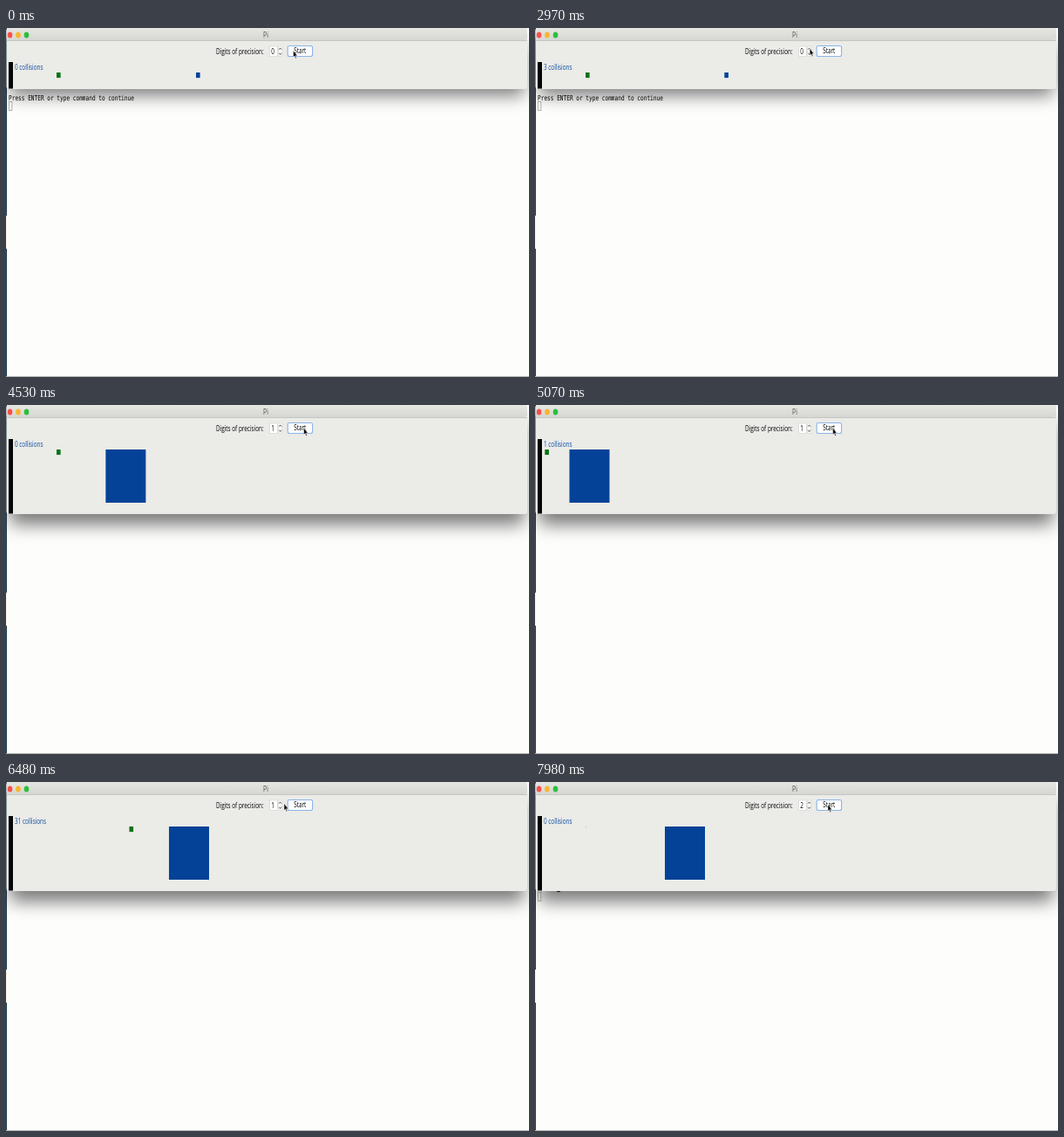
These frames come from a looping animation (600x400 px, 8000 ms). An HTML page:

```html
<!DOCTYPE html>
<html lang="en">
<head>
<meta charset="utf-8">
<title>Colliding blocks</title>
<style>
  html, body { margin: 0; width: 100%; height: 100%; overflow: hidden; background: #fdfdfc; }
  svg { display: block; width: 100vw; height: 100vh; }
  text { font: 8.5px "Open Sans", "Noto Sans", sans-serif; fill: #000; white-space: pre; }
  .mono { font: 8.17px "DejaVu Sans Mono", "Liberation Mono", monospace; }
  .title { font-size: 9px; fill: #4a4a4a; }
  .count { fill: #0a4a9c; }
</style>
</head>
<body>
<svg viewBox="0 0 600 400" preserveAspectRatio="none">
  <defs>
    <filter id="soft" filterUnits="userSpaceOnUse" x="-40" y="-40" width="680" height="300">
      <feGaussianBlur stdDeviation="10"/>
    </filter>
    <linearGradient id="bar" x1="0" y1="0" x2="0" y2="1">
      <stop offset="0" stop-color="#e6e6e3"/>
      <stop offset="1" stop-color="#d6d6d3"/>
    </linearGradient>
  </defs>

  <rect width="600" height="400" fill="#fdfdfc"/>
  <rect width="1" height="400" fill="#173c50"/>
  <rect y="215" width="1" height="38" fill="#f4f1e0"/>
  <rect y="399" width="600" height="1" fill="#b4b4b2"/>

  <text class="mono" id="prompt" transform="translate(3 82.5) scale(.75 1)">Press ENTER or type command to continue</text>
  <rect id="smudge" x="25" y="124.5" width="4" height="1.5" fill="#222"/>
  <rect id="caret" x="3.5" width="3.4" height="10" fill="none" stroke="#a5a5a2" stroke-width=".8"/>

  <rect id="shade" x="5" y="20" width="589" opacity=".52" filter="url(#soft)"/>

  <rect id="window" x="0.5" width="597.5" rx="3" fill="#ebebe8"/>
  <rect x="0.5" width="597.5" height="14" rx="3" fill="url(#bar)"/>
  <rect x="0.5" y="14" width="597.5" height=".8" fill="#bcbcba"/>
  <ellipse cx="4.6" cy="8" rx="2.8" ry="3.5" fill="#f95048"/>
  <ellipse cx="14" cy="8" rx="2.8" ry="3.5" fill="#f8b52e"/>
  <ellipse cx="23.5" cy="8" rx="2.8" ry="3.5" fill="#2bbf3c"/>
  <text class="title" text-anchor="middle" transform="translate(298 11) scale(.75 1)">Pi</text>

  <text transform="translate(241 29.5) scale(.75 1)">Digits of precision:</text>
  <rect x="302.5" y="21" width="9" height="11.5" fill="#fff" stroke="#cfcfcd" stroke-width=".6"/>
  <text id="digit" transform="translate(304.3 29.7) scale(.75 1)">0</text>
  <rect x="312.3" y="20.8" width="4.6" height="11.8" rx="1.8" fill="#fbfbfa" stroke="#c8c8c6" stroke-width=".5"/>
  <path d="M313.3 24.7l1.3-1.8l1.3 1.8M313.3 28.7l1.3 1.8l1.3-1.8" fill="none" stroke="#333" stroke-width=".8"/>
  <rect x="323.2" y="20.5" width="28.4" height="12" rx="2" fill="#fff" stroke="#8cb4e6" stroke-width="1.1"/>
  <text text-anchor="middle" transform="translate(337.3 29.4) scale(.75 1)">Start</text>

  <rect id="wall" x="3" y="39" width="5" fill="#050505"/>
  <text class="count" id="count" transform="translate(10 48.3) scale(.75 1)">0 collisions</text>
  <rect id="small" y="51" fill="#087410"/>
  <rect id="big" y="51" fill="#044298"/>
  <path id="pointer" d="M0 0V8L1.6 6.6L2.7 9.4L3.8 8.8L2.7 6.2H4.8Z" fill="#0a0a0a" stroke="#fff" stroke-width=".5"/>
</svg>
<script>
  const LOOP = 8000, STEP = 30;
  const WALL = 8, SMALL_X = 58, BIG_X = 218, ASPECT = 61 / 46;
  const $ = id => document.getElementById(id);
  const set = (id, attrs) => {
    for (const name in attrs) $(id).setAttribute(name, attrs[name]);
  };

  // keys: [time, distance along the unfolded path]
  const runs = [
    { from: 0, digits: 0, small: 4.6, big: 4.6, height: 70,
      keys: [[30, 0], [3240, 447.8]] },
    { from: 3240, digits: 1, small: 4.6, big: 46, height: 125,
      keys: [[3787, 0], [5200, 197.1], [5320, 218.4], [6690, 409.5]] },
    { from: 6690, digits: 2, small: 0.46, big: 46, height: 125,
      keys: [[7485, 0], [8000, 71.8]] }
  ];

  const pointerKeys = [
    [2250, 329.5, 25.5], [2700, 315.2, 23.3], [3300, 315.2, 23.3], [3690, 341.6, 26],
    [6100, 341.6, 26], [6480, 319, 24.5], [6570, 315.2, 23.3],
    [6960, 315.2, 23.3], [7380, 336, 25.5]
  ];

  function track(keys, t, col = 1) {
    if (t <= keys[0][0]) return keys[0][col];
    for (let i = 1; i < keys.length; i++) {
      const a = keys[i - 1], b = keys[i];
      if (t <= b[0]) return a[col] + (b[col] - a[col]) * (t - a[0]) / (b[0] - a[0]);
    }
    return keys[keys.length - 1][col];
  }

  // Elastic collisions are a straight line folded back into a wedge.
  function collide(run, travelled) {
    const root = 10 ** run.digits, contact = WALL + run.small;
    const x = root * (BIG_X - contact - travelled);
    const y = SMALL_X - WALL;
    const wedge = Math.atan(1 / root), radius = Math.hypot(x, y), angle = Math.atan2(y, x);
    const hits = Math.floor(angle / wedge);
    const rest = angle - hits * wedge;
    const folded = hits % 2 ? wedge - rest : rest;
    return {
      hits,
      smallX: WALL + radius * Math.sin(folded),
      bigX: contact + radius * Math.cos(folded) / root
    };
  }

  const placeBlock = (id, x, side) => set(id, { x, width: side, height: side * ASPECT });

  function draw(time) {
    const t = Math.floor(time % LOOP / STEP) * STEP;
    const run = runs.filter(r => t >= r.from).pop();
    const { digits, height } = run;
    const state = collide(run, track(run.keys, t));

    placeBlock("small", state.smallX, run.small);
    placeBlock("big", state.bigX, run.big);
    $("count").textContent = state.hits + " collisions";
    $("digit").textContent = digits;

    set("window", { height });
    set("wall", { height: height - 39.5 });
    set("shade", { height: height - 20 + (digits ? 12 : 7) });

    set("prompt", { visibility: digits ? "hidden" : "visible" });
    set("smudge", { visibility: digits === 2 ? "visible" : "hidden" });
    set("caret", { y: digits === 2 ? 126.3 : 84.5 });

    const px = track(pointerKeys, t, 1), py = track(pointerKeys, t, 2);
    set("pointer", { transform: `translate(${px} ${py})` });
  }

  const start = performance.now();
  function tick(now) {
    draw(Math.max(0, now - start));
    requestAnimationFrame(tick);
  }
  draw(0);
  requestAnimationFrame(tick);
</script>
</body>
</html>
```
